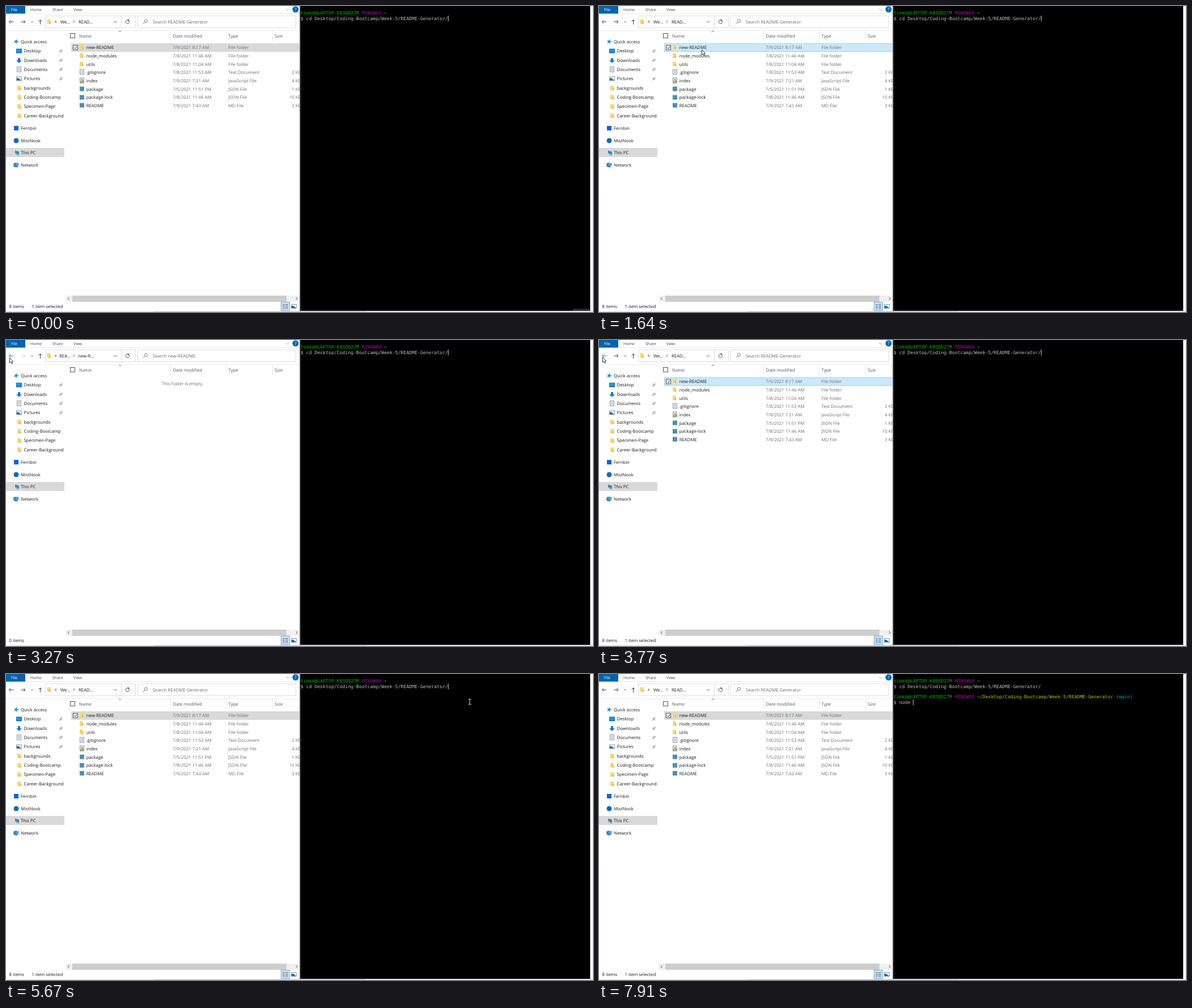
An HTML page with a canvas for the animation above (8 s loop, 1036 by 541 pixels).

```html
<!DOCTYPE html>
<html lang="en">
<head>
<meta charset="utf-8">
<title>File explorer and terminal</title>
<style>
  html, body { margin: 0; width: 100%; height: 100%; overflow: hidden; background: #fff; }
  canvas { display: block; }
</style>
</head>
<body>
<canvas id="stage" width="1036" height="541"></canvas>
<script>
const ctx = document.getElementById('stage').getContext('2d');
const LOOP = 8000;
const UI = '"Open Sans", "Noto Sans", sans-serif';
const MONO = '"DejaVu Sans Mono", "Liberation Mono", monospace';
const BLUE = '#0063b1', FOLDER = '#f8d775';

// Times of the visible state changes
const FOCUS_LIST = 1640, OPEN = 2140, EMPTY_NOTE = 2250, BACK = 3400,
      FOCUS_TERM = 5040, CARET_OFF = 6160, NEW_LINE = 6280, PROMPT = 6530;
const KEY_TIMES = [7290, 7410, 7660, 7780, 7910];

// Pointer stops: time, x, y. Each holds until the next.
const POINTER = [
  [380, 916, 525.5], [520, 720, 440], [630, 492, 330], [880, 385, 225], [1010, 262, 114],
  [1260, 245, 118], [1390, 222, 104], [1510, 197, 88], [1640, 181, 77], [1760, 176, 63],
  [1880, 175, 68], [2010, 174, 71], [2770, 80, 56], [2880, 4, 45], [3020, 4, 35],
  [3150, 6, 31], [3770, 6, 30], [3900, 330, 70], [4020, 612, 109], [4160, 616, 111],
  [4410, 614, 90], [4540, 610, 66], [4660, 604, 45], [4780, 600, 31], [4910, 597, 24],
  [5040, 596, 22], [5290, 640, 27], [5420, 720, 38], [5540, 795, 46], [5670, 818, 49], [6040]
];

const FILES = [
  ['new-README', '7/9/2021 8:17 AM', 'File folder', '', 'folder'],
  ['node_modules', '7/8/2021 11:46 AM', 'File folder', '', 'folder'],
  ['utils', '7/8/2021 11:04 AM', 'File folder', '', 'folder'],
  ['.gitignore', '7/8/2021 11:53 AM', 'Text Document', '2 KB', 'page'],
  ['index', '7/9/2021 7:21 AM', 'JavaScript File', '4 KB', 'script'],
  ['package', '7/5/2021 11:51 PM', 'JSON File', '1 KB', 'app'],
  ['package-lock', '7/8/2021 11:46 AM', 'JSON File', '10 KB', 'app'],
  ['README', '7/9/2021 7:43 AM', 'MD File', '3 KB', 'app']
];

// Sidebar: label, y, icon, indented
const PLACES = [
  ['Quick access', 63, 'star'],
  ['Desktop', 79.5, 'desktop', 1], ['Downloads', 96, 'download', 1],
  ['Documents', 112, 'page', 1], ['Pictures', 128.5, 'picture', 1],
  ['backgrounds', 145, 'folder', 1], ['Coding-Bootcamp', 161.3, 'folder', 1],
  ['Specimen-Page', 177.6, 'folder', 1], ['Career-Background', 194, 'folder', 1],
  ['Fernbin', 216, 'square'], ['MistNook', 238, 'disc'],
  ['This PC', 259.5, 'computer'], ['Network', 281, 'network']
];

function rect(x, y, w, h, color) {
  ctx.fillStyle = color;
  ctx.fillRect(x, y, w, h);
}
function frame(x, y, w, h, color) {
  ctx.strokeStyle = color;
  ctx.lineWidth = 1;
  ctx.strokeRect(x + .5, y + .5, w - 1, h - 1);
}
function line(points, color, width = 1) {
  ctx.strokeStyle = color;
  ctx.lineWidth = width;
  ctx.beginPath();
  for (let i = 0; i < points.length; i += 2) ctx.lineTo(points[i], points[i + 1]);
  ctx.stroke();
}
function poly(points, color) {
  ctx.fillStyle = color;
  ctx.beginPath();
  for (let i = 0; i < points.length; i += 2) ctx.lineTo(points[i], points[i + 1]);
  ctx.fill();
}
function disc(x, y, r, color) {
  ctx.fillStyle = color;
  ctx.beginPath();
  ctx.arc(x, y, r, 0, 7);
  ctx.fill();
}
function text(s, x, y, color = '#1a1a1a', size = 7.8, align = 'left') {
  ctx.font = `${size}px ${UI}`;
  ctx.textAlign = align;
  ctx.fillStyle = color;
  ctx.fillText(s, x, y + size * .36);
}
// dx, dy give the direction the chevron points to
function chevron(x, y, dx, dy, color = '#555', r = 2.4) {
  const a = dx * r / 2, b = dy * r / 2;
  line([x - a - dy * r, y - b - dx * r, x + a, y + b, x - a + dy * r, y - b + dx * r], color);
}
function arrow(x, y, dx, dy, color) {
  const r = 4, tx = x + dx * r, ty = y + dy * r;
  line([x - dx * r, y - dy * r, tx, ty], color);
  line([tx - dx * 3 + dy * 3, ty - dy * 3 + dx * 3, tx, ty, tx - dx * 3 - dy * 3, ty - dy * 3 - dx * 3], color);
}
function checkbox(x, y, checked) {
  rect(x, y, 9, 9, '#fff');
  frame(x, y, 9, 9, '#555');
  if (checked) line([x + 2, y + 4.5, x + 4, y + 6.5, x + 7.3, y + 2.4], '#222');
}

// Icons are drawn around their centre
const ICONS = {
  folder(x, y) {
    rect(x - 3, y - 4, 6, 8, FOLDER);
    rect(x + 1, y, 2.5, 4, '#e9b94a');
  },
  page(x, y) {
    rect(x - 4, y - 5, 8, 10, '#f6f6f6');
    frame(x - 4, y - 5, 8, 10, '#8f979c');
    for (let i = -2; i < 4; i += 2) line([x - 2, y + i, x + 2, y + i], '#7d9bb0', .8);
  },
  script(x, y) {
    ICONS.page(x, y);
    rect(x - 4, y + 1, 4, 4, '#c9a240');
    line([x - 1, y - 2, x + 3, y + 2, x, y + 4], '#555');
  },
  app(x, y) { rect(x - 4, y - 4, 8, 8, '#4f8db5'); },
  star(x, y) {
    const p = [];
    for (let i = 0; i < 10; i++) {
      const r = i % 2 ? 2 : 4.8, a = i * Math.PI / 5 - 1.3;
      p.push(x + r * Math.cos(a), y + r * Math.sin(a));
    }
    poly(p, '#2a8fd8');
  },
  desktop(x, y) {
    rect(x - 5, y - 4, 10, 8, '#0f6fc0');
    rect(x - 4, y - 3, 8, 5, '#1f96e8');
  },
  download(x, y) {
    rect(x - 2, y - 4, 4, 5, '#2178cf');
    poly([x - 5, y, x + 5, y, x, y + 5], '#2178cf');
  },
  picture(x, y) {
    rect(x - 5, y - 4, 10, 8, '#eef4f8');
    frame(x - 5, y - 4, 10, 8, '#8aa3b3');
    poly([x - 4, y - 1, x - 1, y - 1, x + 4, y + 3, x - 4, y + 3], '#27699d');
  },
  square(x, y) { rect(x - 4, y - 4, 8, 8, '#0a62f0'); },
  disc(x, y) { disc(x, y, 4.5, '#0f6cbd'); },
  computer(x, y) {
    poly([x - 3, y - 4, x + 4, y - 2, x + 4, y + 3, x - 3, y + 1], '#3b87bd');
    line([x - 1, y + 3, x + 4, y + 4], '#6b7f8c');
  },
  network(x, y) {
    disc(x - 1, y, 4, '#3389c9');
    poly([x - 1, y - 4, x + 5, y - 3, x + 4, y + 2, x - 1, y + 1], '#5b9fd2');
    line([x - 3, y + 3, x + 3, y + 4], '#46627a');
  }
};

function drawToolbar(inside, pointer) {
  rect(0, 0, 34, 13.5, BLUE);
  text('File', 14.5, 6.3, '#fff', 7, 'center');
  text('Home', 43, 6.3, '#444', 7);
  text('Share', 82, 6.3, '#444', 7);
  text('View', 119, 6.3, '#444', 7);
  rect(34, 13, 485, 1, '#e9e9e9');
  chevron(497, 6, 0, 1, '#aaa', 3);
  disc(511, 6, 5.5, BLUE);
  text('?', 511, 6.2, '#fff', 8, 'center');

  const overBack = pointer && pointer[0] < 18 && pointer[1] > 22 && pointer[1] < 40;
  arrow(9.5, 28, -1, 0, overBack ? '#0a84d8' : '#444');
  arrow(30, 28, 1, 0, inside ? '#d4d4d4' : '#444');
  chevron(46, 28, 0, 1, '#777', 2);
  arrow(60.5, 28.5, 0, -1, '#444');
  frame(69, 17, 135, 22, '#dcdcdc');
  frame(203, 17, 26, 22, '#dcdcdc');
  frame(232, 17, 280, 22, '#dcdcdc');
  ICONS.folder(75.5, 27.5);
  text('«', 85.5, 27, '#333', 8.5);
  text(inside ? 'REA...' : 'We...', inside ? 94 : 96, 28);
  chevron(120, 27.5, 1, 0, '#555', 2.2);
  text(inside ? 'new-R...' : 'READ...', inside ? 127 : 128, 28);
  chevron(193, 28, 0, 1, '#555', 2.6);
  ctx.lineWidth = 1;
  ctx.strokeStyle = '#555';
  ctx.beginPath();
  ctx.arc(214.5, 28, 3.2, -.5, 5);
  ctx.stroke();
  poly([215, 23, 218, 25.5, 215, 27], '#555');
  ctx.strokeStyle = '#777';
  ctx.beginPath();
  ctx.arc(247, 26.5, 2.7, 0, 7);
  ctx.stroke();
  line([245, 28.5, 241.5, 32], '#777');
  text('Search ' + (inside ? 'new-README' : 'README-Generator'), 259, 28, '#6b6b6b');
  rect(0, 43, 519, 1, '#ececec');
}

function drawSidebar() {
  rect(0, 251, 103, 16, '#d9d9d9');
  ctx.save();
  ctx.beginPath();
  ctx.rect(0, 44, 102.5, 497);
  ctx.clip();
  PLACES.forEach(([label, y, icon, indent], i) => {
    ICONS[icon](indent ? 23 : icon === 'computer' ? 19 : 18, y);
    text(label, indent ? 31.5 : 26, y);
    if (i > 0 && i < 5) {
      line([94, y + 3, 96.5, y + .5], '#777');
      line([94.5, y - 1, 98, y + 2.5], '#777');
      line([96, y - .5, 98, y - 2.5, 99.5, y - 1, 97.5, y + 1], '#777');
    }
  });
  ctx.restore();
}

function drawList(t, inside, pointer) {
  checkbox(113, 48, false);
  [['Name', 129], ['Date modified', 294.5], ['Type', 392.5], ['Size', 474]]
    .forEach(([label, x]) => text(label, x, 52.7, '#4c5a6c'));
  [290, 388, 470].forEach(x => rect(x, 44, 1, 18, '#e5e5e5'));
  chevron(201, 45, 0, -1, '#777');

  if (inside) {
    if (t >= EMPTY_NOTE) text('This folder is empty.', 311.5, 77.3, '#6d6d6d', 7.8, 'center');
  } else {
    const focused = t >= FOCUS_LIST && t < FOCUS_TERM;
    const hover = pointer && pointer[0] > 115 && pointer[0] < 519
      ? Math.floor((pointer[1] - 66) / 14.72) : -1;
    FILES.forEach(([name, date, type, size, icon], i) => {
      const y = 73.3 + i * 14.72, top = Math.round(y - 7.3);
      if (i === 0) {
        rect(115, top, 404, 15, focused ? '#cce8ff' : '#d9d9d9');
        if (focused) frame(115, top, 405, 15, '#99d1ff');
      } else if (i === hover) rect(115, top, 404, 15, '#e5f3ff');
      if (i === 0 || i === hover) checkbox(118, top + 3, i === 0);
      ICONS[icon](icon === 'folder' ? 133 : 134, Math.round(y) - .5);
      text(name, 141.7, y);
      text(date, 294.3, y, '#6d6d6d');
      text(type, 392.5, y, '#6d6d6d');
      text(size, 520.5, y, '#6d6d6d', 7.8, 'right');
    });
  }

  rect(105, 512, 414, 11, '#f0f0f0');
  rect(117, 512, 378, 11, '#cdcdcd');
  chevron(110.5, 517.3, -1, 0, '#444');
  chevron(513, 517.3, 1, 0, '#444');
  text(inside ? '0 items' : '8 items', 5.5, 531.3);
  if (!inside) text('1 item selected', 45.5, 531.3);
  rect(485, 523, 16, 16, '#cce8ff');
  frame(485, 523, 16, 16, '#5fb2e6');
  for (let y = 527.5; y < 537; y += 2.5) {
    line([488, y, 492, y], '#667');
    line([493, y, 498, y], '#667');
  }
  ICONS.picture(508, 531);
}

const CELL = 4.906, ROW = 9.33, TERM_X = 520, TERM_Y = 8;

// Writes [text, colour] runs on the character grid
function termLine(row, ...runs) {
  let col = 0;
  ctx.font = `8.1px ${MONO}`;
  ctx.textAlign = 'left';
  for (const [s, color] of runs) {
    ctx.fillStyle = color;
    for (const ch of s) ctx.fillText(ch, TERM_X + CELL * col++, TERM_Y + ROW * row + 7.2);
  }
}
function caret(row, col) {
  rect(Math.round(TERM_X + CELL * col), Math.floor(TERM_Y + ROW * row), 1, 10, '#c8c8c8');
}

function drawTerminal(t) {
  const grey = '#bfbfbf', path = 'Desktop/Coding-Bootcamp/Week-5/README-Generator';
  const command = `$ cd ${path}/`;
  const prompt = [['timkd@LAPTOP-K83QD27M ', '#00b400'], ['MINGW64 ', '#b400b4']];
  rect(518, 0, 2, 541, '#8a8a8a');
  rect(519.5, 0, 511.5, 539, '#000');
  rect(1031, 0, 5, 541, '#f4f4f4');
  rect(0, 539.5, 1036, 1.5, '#e2e2e2');
  rect(262, 540, 373, 1, '#bdbdbd');
  if (t < 130) rect(1001, 535, 29, 4, '#2b2b2b');

  termLine(0, ...prompt, ['~', '#bfbf00']);
  termLine(1, [command, grey]);
  if (t < CARET_OFF) caret(1, command.length);
  else if (t >= NEW_LINE && t < PROMPT) caret(2, 0);
  if (t < PROMPT) return;

  const typed = KEY_TIMES.filter(k => t >= k).length;
  termLine(3, ...prompt, [`~/${path} `, '#bfbf00'], ['(main)', '#00b4b4']);
  termLine(4, ['$ ' + 'node '.slice(0, typed), grey]);
  if (typed || t < PROMPT + 500) caret(4, 2 + typed);
}

function drawPointer([x, y]) {
  if (x > 519) {
    line([x + .5, y - 4, x + .5, y + 4], '#d0d0d0');
    line([x - 2, y - 4.5, x + 3, y - 4.5], '#d0d0d0');
    line([x - 2, y + 4.5, x + 3, y + 4.5], '#d0d0d0');
    return;
  }
  const shape = [0, 0, 0, 9, 2, 7.2, 3.6, 10.5, 5, 9.8, 3.5, 6.6, 6.3, 6.4, 0, 0]
    .map((v, i) => v + .5 + (i % 2 ? y : x));
  poly(shape, '#fff');
  line(shape, '#222', .9);
}

function draw(t) {
  const stop = POINTER.findLast(p => p[0] <= t);
  const pointer = stop && stop.length > 1 ? stop.slice(1) : null;
  const inside = t >= OPEN && t < BACK;
  ctx.textRendering = 'geometricPrecision';
  rect(0, 0, 1036, 541, '#fff');
  drawToolbar(inside, pointer);
  drawSidebar();
  drawList(t, inside, pointer);
  drawTerminal(t);
  if (pointer) drawPointer(pointer);
}

const start = performance.now();
function tick() {
  draw((performance.now() - start) % LOOP);
  requestAnimationFrame(tick);
}
tick();
</script>
</body>
</html>
```
